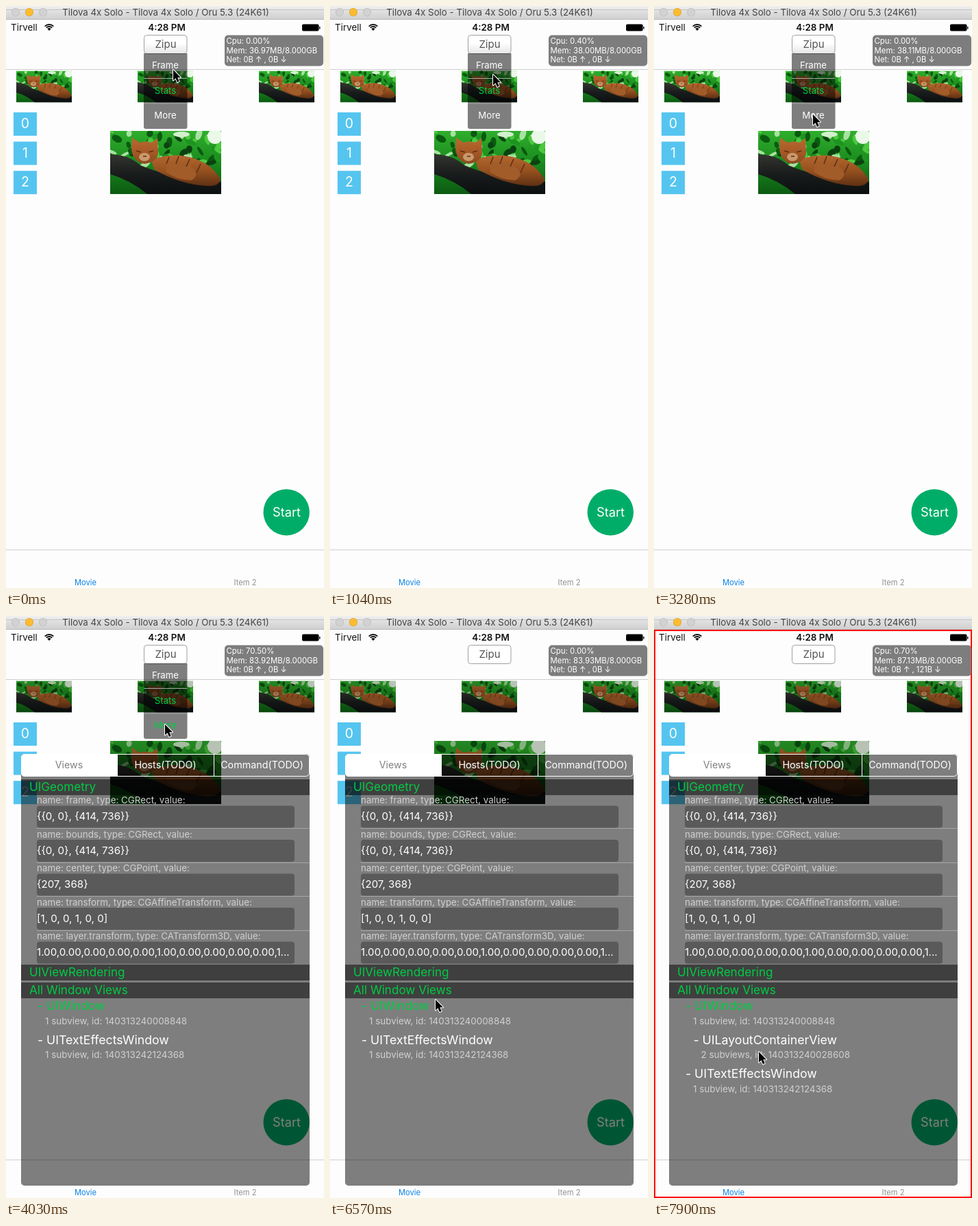
Write an HTML page with a canvas that moves like this. It is 464 by 848 pixels and loops after 8 s.

```html
<!DOCTYPE html>
<html lang="en">
<head>
<meta charset="utf-8">
<title>View inspector demo</title>
<style>
html, body { margin: 0; width: 464px; height: 848px; overflow: hidden; background: #fdfdfd; }
canvas { display: block; }
</style>
</head>
<body>
<canvas id="stage" width="464" height="848"></canvas>
<script>
const ctx = document.getElementById('stage').getContext('2d');
const LOOP = 8000, GREEN = '#00cc44', SHADE = 'rgba(0,0,0,.5)';
const PANEL_AT = 4030, MENU_OFF = 4180, EXPAND_AT = 7600;

// Each entry holds from its time until the next one.
const cursorKeys = [
  [0, 244, 93], [150, 245, 92], [300, 246, 91], [440, 246, 92], [590, 245, 93],
  [890, 243, 95], [1040, 238, 100], [1190, 234, 140], [1340, 231, 175],
  [1640, 230, 172], [1790, 231, 164], [1930, 232, 158],
  [4920, 221, 158], [5820, 214, 260], [5970, 196, 440], [6120, 182, 574],
  [6570, 154, 559], [6710, 140, 568], [6860, 131, 584], [7010, 136, 603], [7160, 146, 600],
  [7450, 150, 612], [7600, 152, 626], [7750, 153, 635]
];
const statKeys = [
  [0, '0.00', '36.97', '0B'], [890, '0.40', '38.00', '0B'], [1640, '0.00', '38.07', '0B'],
  [2980, '0.00', '38.11', '0B'], [4030, '70.50', '83.92', '0B'], [4920, '3.30', '83.93', '0B'],
  [5820, '0.00', '83.93', '0B'], [EXPAND_AT, '0.70', '87.13', '121B']
];
const at = (keys, t) => keys.filter(k => k[0] <= t).pop();

const fields = [
  ['frame', 'CGRect', '{{0, 0}, {414, 736}}'],
  ['bounds', 'CGRect', '{{0, 0}, {414, 736}}'],
  ['center', 'CGPoint', '{207, 368}'],
  ['transform', 'CGAffineTransform', '[1, 0, 0, 1, 0, 0]'],
  ['layer.transform', 'CATransform3D', '1.00,0.00,0.00,0.00,0.00,1.00,0.00,0.00,0.00,0.00,1...']
];

function text(str, x, y, size, color, align = 'left', weight = 400) {
  ctx.font = `${weight} ${size}px Inter, Roboto, sans-serif`;
  ctx.textAlign = align;
  ctx.textBaseline = 'middle';
  ctx.fillStyle = color;
  ctx.fillText(str, x, y);
}

function rect(x, y, w, h, color) {
  ctx.fillStyle = color;
  ctx.fillRect(x, y, w, h);
}

function box(x, y, w, h, r, fill, stroke) {
  ctx.beginPath();
  ctx.roundRect(x, y, w, h, r);
  if (fill) { ctx.fillStyle = fill; ctx.fill(); }
  if (stroke) { ctx.strokeStyle = stroke; ctx.lineWidth = 1; ctx.stroke(); }
}

function oval(x, y, rx, ry, color, turn = 0) {
  ctx.beginPath();
  ctx.ellipse(x, y, rx, ry, turn, 0, 7);
  ctx.fillStyle = color;
  ctx.fill();
}

function shape(path, color) {
  ctx.fillStyle = color;
  ctx.fill(new Path2D(path));
}

function gradient(y0, y1, ...colors) {
  const g = ctx.createLinearGradient(0, y0, 0, y1);
  colors.forEach((c, i) => g.addColorStop(i / (colors.length - 1), c));
  return g;
}

// Cat on a branch, drawn in a 162 by 92 field.
function photo(x, y, scale, dark) {
  ctx.save();
  ctx.translate(x, y);
  ctx.scale(scale, scale);
  ctx.beginPath();
  ctx.rect(0, 0, 162, 92);
  ctx.clip();
  rect(0, 0, 162, 92, gradient(0, 92, '#2fae2c', '#1a8a1e', '#0c5a12'));
  let seed = 7;
  const rnd = () => (seed = seed * 16807 % 2147483647) / 2147483647;
  const leaves = ['#4cc83e', '#0a5a10', '#1d9420', '#a8e2a0', '#0b4210'];
  for (let i = 0; i < 70; i++) {
    oval(rnd() * 162, rnd() * 50, 3 + rnd() * 6, 2 + rnd() * 3, leaves[i % 5], rnd() * 3);
  }
  oval(153, 8, 11, 11, '#eaf8e8');
  oval(104, 5, 12, 4, '#d2f0cc');
  shape('M0 35Q24 33 44 50Q90 70 162 74V92H54Q30 72 0 63Z', gradient(34, 92, '#33352f', '#191c1c', '#0c0f10'));
  shape('M60 42Q92 30 122 40Q150 49 161 71Q158 82 140 80Q102 78 64 56Z', gradient(34, 82, '#b5682f', '#96511f', '#5a2d12'));
  shape('M82 50Q104 40 122 55Q130 66 118 72Q98 72 82 60Z', '#a25c2a');
  shape('M31 26L32 10L43 17Q52 14 60 17L69 11L70 32Q68 46 50 48Q33 45 31 26Z', gradient(10, 48, '#b96a30', '#a85a26', '#8a4a22'));
  oval(50, 38, 8, 6, '#c8996c');
  ctx.strokeStyle = '#5c2c12';
  ctx.lineWidth = 1.5;
  ctx.stroke(new Path2D('M38 29L45 31M56 31L63 29M48 37H53M86 38L82 48M100 37L96 48M116 41L111 52M132 48L126 61'));
  if (dark) rect(0, 0, 162, 92, 'rgba(0,0,0,.22)');
  ctx.restore();
}

function titleBar() {
  rect(0, 0, 464, 20, gradient(0, 20, '#f0f0f0', '#dcdcdc', '#cfcfcf'));
  rect(0, 5, 464, 1, '#c2c2c2');
  rect(0, 19, 464, 1, '#b8b8b8');
  [14, 34, 54].forEach((x, i) => {
    oval(x, 9, 6, 6, i == 1 ? '#dfa023' : '#bdbdbd');
    oval(x, 9, 5.2, 5.2, i == 1 ? '#fdbc30' : '#d2d2d2');
  });
  text('Tilova 4x Solo - Tilova 4x Solo / Oru 5.3 (24K61)', 233, 9.5, 13.3, '#444', 'center');
}

function statusBar() {
  text('Tirvell', 7, 32, 13.4, '#111');
  ctx.strokeStyle = '#111';
  ctx.lineWidth = 1.8;
  [9, 6].forEach(r => {
    ctx.beginPath();
    ctx.arc(63, 36, r, -2.35, -.79);
    ctx.stroke();
  });
  shape('M63 36L60.3 33.2Q63 31 65.7 33.2Z', '#111');
  text('4:28 PM', 234.5, 32, 13.4, '#111', 'center', 600);
  box(432, 26.5, 24.5, 10, 2, '#000');
  rect(457, 30, 1.5, 3.5, '#222');
}

function statsBox([, cpu, mem, down]) {
  box(319, 42.5, 144, 45, 5, '#7d7d7d');
  text(`Cpu: ${cpu}%`, 321.5, 52, 11.4, '#fff');
  text(`Mem: ${mem}MB/8.000GB`, 321.5, 65.5, 11.4, '#fff');
  text(`Net: 0B ↑ , ${down} ↓`, 321.5, 79, 11.2, '#fff');
}

function menu(t) {
  const open = t < MENU_OFF;
  const fill = t < PANEL_AT ? gradient(54, 69, '#fff', '#e6e6e6') : '#fff';
  box(201.5, 42.5, 62.5, 27, 4, fill, '#a0a0a0');
  text('Zipu', 233, 56.5, 15, '#555', 'center');
  if (!open) return;
  box(201, 69, 63.5, 110, [0, 0, 3, 3], SHADE);
  rect(201, 105, 63.5, 1, '#a8a8a8');
  rect(201, 141.5, 63.5, 1, '#a8a8a8');
  text('Frame', 232.5, 87.5, 13.2, '#fff', 'center');
  text('Stats', 232.5, 124, 13.2, GREEN, 'center');
  text('More', 232.5, 160.5, 13.2, t < PANEL_AT ? '#fff' : GREEN, 'center');
}

function app(t) {
  const dark = t >= PANEL_AT;
  rect(0, 20, 464, 828, '#fdfdfd');
  rect(0, 92, 464, 1, '#cfcfcf');
  [15, 192, 369].forEach(x => photo(x, 94.5, .5, dark));
  photo(152, 182, 1, dark);
  [0, 1, 2].forEach(i => {
    const y = 155 + i * 42.6;
    rect(11, y, 34, 34, '#55c5f0');
    text(i, 28, y + 17.3, 19.5, '#fff', 'center');
  });
  rect(0, 792, 464, 1, '#cfcfcf');
  oval(409.2, 737.7, 33.7, 33.7, '#00ad68');
  text('Start', 409.5, 738.5, 18.2, '#fff', 'center');
  text('Movie', 116, 840.5, 11.2, '#0b84e6', 'center');
  text('Item 2', 349, 840.5, 11.2, '#929292', 'center');
}

function section(title, y) {
  rect(22, y, 421, 23, SHADE);
  text(title, 34, y + 12, 17.1, GREEN);
}

function node(row, indent, name, info, color = '#fff') {
  const x = 46 + indent * 11.5, y = 569 + row * 49.5;
  text('- ' + name, x, y, 17.7, color);
  text(info, x + 11, y + 21.5, 13.4, '#d0d0d0');
}

function panel(t) {
  const expanded = t >= EXPAND_AT;
  box(22, 201, 421, 629, 5, SHADE);
  box(22, 201, 141, 33, [5, 0, 0, 5], '#fff');
  box(22.5, 201.5, 420, 32, 5, null, '#fff');
  rect(303, 201, 1, 33, '#fff');
  text('Views', 92, 217.5, 14.2, '#808080', 'center');
  text('Hosts(TODO)', 232.5, 217.5, 14.3, '#fff', 'center');
  text('Command(TODO)', 373.5, 217.5, 14.3, '#fff', 'center');

  section('UIGeometry', 238);
  fields.forEach(([name, type, value], i) => {
    const y = 269 + i * 49.5;
    text(`name: ${name}, type: ${type}, value:`, 45, y, 13.4, '#d0d0d0');
    box(45, y + 7.5, 376, 32, 4, '#5a5a5a');
    text(value, 45, y + 23.5, 15.1, '#fff');
    if (i < 4) rect(45, Math.round(y + 40), 398, 1, '#a6a6a6');
  });
  section('UIViewRendering', 508);
  section('All Window Views', 534);

  node(0, 0, 'UIWindow', '1 subview, id: 140313240008848', GREEN);
  if (expanded) node(1, 1, 'UILayoutContainerView', '2 subviews, id: 140313240028608');
  node(expanded ? 2 : 1, 0, 'UITextEffectsWindow', '1 subview, id: 140313242124368');
}

function cursor([, x, y]) {
  const arrow = new Path2D('M0 0V15.5L3.5 12.2L6 18L8.7 16.8L6.3 11.3H11Z');
  ctx.save();
  ctx.translate(x, y);
  ctx.lineWidth = 2;
  ctx.lineJoin = 'round';
  ctx.strokeStyle = '#fff';
  ctx.stroke(arrow);
  ctx.fillStyle = '#000';
  ctx.fill(arrow);
  ctx.restore();
}

function draw(now) {
  const t = now % LOOP;
  app(t);
  titleBar();
  statusBar();
  if (t >= EXPAND_AT) {
    ctx.strokeStyle = '#f00';
    ctx.lineWidth = 2;
    ctx.strokeRect(1, 21, 462, 826);
  }
  if (t >= PANEL_AT) panel(t);
  menu(t);
  statsBox(at(statKeys, t));
  cursor(at(cursorKeys, t));
  requestAnimationFrame(draw);
}
draw(0);
</script>
</body>
</html>
```
